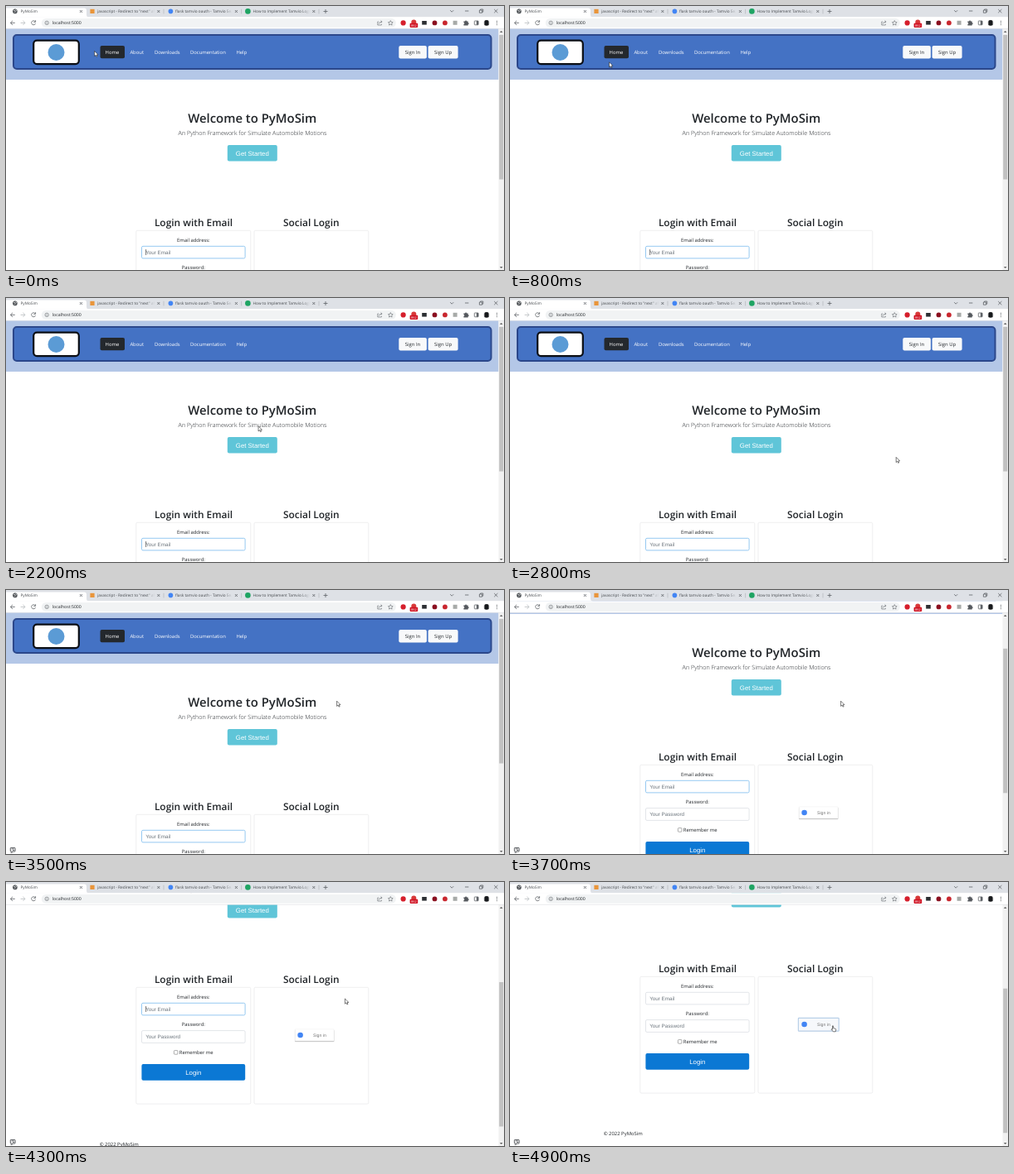
These frames come from a looping animation (600x319 px, 5 s). An HTML page:

```html
<!DOCTYPE html>
<html lang="en">
<head>
<meta charset="utf-8">
<title>PyMoSim</title>
<style>
  html, body { margin: 0; width: 100%; height: 100%; overflow: hidden; background: #fff; }
  svg { display: block; width: 100%; height: 100%; }
  text { font: 5.9px "Open Sans", "Noto Sans", sans-serif; fill: #212529; text-rendering: geometricPrecision; white-space: pre; }
  .mid { text-anchor: middle; }
  .white { fill: #fff; }
  .h1 { font-size: 14.9px; font-weight: 600; }
  .h2 { font-size: 11.9px; font-weight: 600; }
  .lead { font-size: 7.2px; font-weight: 300; }
  .arial { font-family: "Liberation Sans", Arial, sans-serif; }
  .btn { font-size: 7.8px; fill: #fff; }
  .hint { font-size: 6.25px; fill: #6c757d; }
  .tab { font-size: 4.75px; fill: #45494d; }
  .line { fill: none; stroke: #5f6368; stroke-width: .8; }
  .card { fill: #fff; stroke: #e2e3e5; stroke-width: .6; }
  .field { fill: #fff; stroke: #ced4da; stroke-width: .6; }
  .field.focus { stroke: #7cbcee; stroke-width: .8; }
</style>
</head>
<body>
<svg viewBox="0 0 600 319" preserveAspectRatio="none">
  <defs>
    <linearGradient id="fade">
      <stop offset="0" stop-color="#dee1e6" stop-opacity="0"/>
      <stop offset="1" stop-color="#dee1e6"/>
    </linearGradient>
  </defs>
  <rect width="600" height="319" fill="#fff"/>

  <g id="page">
    <rect y="20" width="593.5" height="69" fill="#b4c7e7"/>
    <rect x="9" y="35" width="575.5" height="41" rx="4" fill="#4472c4" stroke="#2b478b" stroke-width="2"/>
    <rect x="33.2" y="41.7" width="54.6" height="28.4" rx="4" fill="#fff" stroke="#0b0e14" stroke-width="2.2"/>
    <circle cx="60.5" cy="56" r="10" fill="#5b9bd5"/>
    <rect x="113.5" y="48" width="29.5" height="15.3" rx="2" fill="#24282d"/>
    <g id="nav"></g>
    <rect x="473.3" y="48" width="33.6" height="15.6" rx="2" fill="#f8f9fa"/>
    <rect x="508.6" y="48" width="36" height="15.6" rx="2" fill="#f8f9fa"/>
    <text class="mid" x="490" y="58">Sign In</text>
    <text class="mid" x="526.6" y="58">Sign Up</text>

    <text class="h1 mid" x="296.7" y="141.2">Welcome to PyMoSim</text>
    <text class="lead mid" x="297" y="155.6">An Python Framework for Simulate Automobile Motions</text>
    <rect x="266.8" y="168" width="60" height="19.6" rx="2" fill="#5fc5d8"/>
    <text class="arial btn mid" x="296.8" y="180.6">Get Started</text>

    <text class="h2 mid" x="226" y="266">Login with Email</text>
    <text class="h2 mid" x="367.8" y="266">Social Login</text>
    <rect class="card" x="156.8" y="271.3" width="138" height="140.8" rx="1.5"/>
    <rect class="card" x="299" y="271.3" width="137.8" height="140.8" rx="1.5"/>

    <text class="mid" x="225.8" y="284.7">Email address:</text>
    <rect id="email" class="field" x="163.5" y="290.3" width="124.6" height="14.6" rx="1.5"/>
    <text class="arial hint" x="168.2" y="299.9">Your Email</text>
    <path id="caret" d="M168.6 294v7" stroke="#222" stroke-width=".6"/>
    <text class="mid" x="225.8" y="318.2">Password:</text>
    <rect class="field" x="163.5" y="323.6" width="124.6" height="14.8" rx="1.5"/>
    <text class="arial hint" x="168.2" y="333.3">Your Password</text>
    <rect x="202.4" y="347.6" width="4.6" height="4.6" rx=".8" fill="#fff" stroke="#767676" stroke-width=".6"/>
    <text x="208.8" y="352">Remember me</text>
    <rect x="163.4" y="364" width="124.8" height="19.8" rx="2" fill="#0b78d4"/>
    <text class="arial btn mid" x="225.8" y="376.6">Login</text>

    <rect x="347.9" y="323.1" width="47.6" height="14.2" rx=".8" fill="#000" opacity=".14"/>
    <rect x="348.1" y="322.6" width="47.1" height="14.1" rx=".6" fill="#000" opacity=".13"/>
    <rect x="348.2" y="321.9" width="46.9" height="14" rx=".5" fill="#fff" stroke="#e4e4e4" stroke-width=".3"/>
    <rect id="ring" x="347.4" y="321.4" width="48.8" height="15.8" rx=".6" fill="#f6f8fb" stroke="#b9d0e8" stroke-width="1.2"/>
    <circle cx="354.6" cy="329" r="3.3" fill="#4285f4"/>
    <text class="arial" x="370" y="330.8" style="font-size:5.2px;fill:#757575">Sign in</text>
    <text x="112.7" y="463.3">© 2022 PyMoSim</text>
  </g>

  <rect x="593.5" y="27" width="6.5" height="292" fill="#f1f1f1"/>
  <rect id="thumb" x="594.2" y="35" width="5" height="174.5"/>
  <path d="M594.9 32l1.8-2 1.8 2zM594.9 315l1.8 2 1.8-2z" fill="#606060"/>

  <g id="browser">
    <rect width="600" height="13.5" fill="#dee1e6"/>
    <path d="M0 13.5V2.5h94q3 0 3 3v5q0 3 3 3z" fill="#fff"/>
    <rect y="13.3" width="600" height="14" fill="#fff"/>
    <path d="M0 27.4h600" stroke="#dcdee2" stroke-width=".6"/>
    <g id="tabs"></g>
    <circle cx="10.9" cy="6.4" r="2.8" fill="#505458"/>
    <path d="M8.9 5.2l2 .4.4 1.3-1.2 1.4M11.8 4.2l.4 1.1 1 .5" fill="none" stroke="#fff" stroke-width=".6"/>
    <path class="line" d="M385 4v5M382.5 6.5h5M535.2 5.2l2 2 2-2M553 6h4.4M570.4 5h3.2v3.2h-3.2zM571.6 5v-1h3.2v3.2h-1.1M588.2 4l4.2 4.2M592.4 4l-4.2 4.2"/>
    <path class="line" d="M10.8 20.4H5.4M8 17.8l-2.6 2.6L8 23"/>
    <path class="line" style="stroke:#b8bbbf" d="M17.6 20.4H23M20.4 17.8l2.6 2.6-2.6 2.6"/>
    <path class="line" d="M35.2 18.8a2.5 2.5 0 1 0 .3 2.4M35.6 17.2v2.2h-2.2"/>
    <rect x="42.8" y="15" width="427" height="10.8" rx="5.4" fill="#f1f3f4"/>
    <circle class="line" cx="49.2" cy="20.4" r="2.2" style="stroke-width:.6"/>
    <path class="line" d="M49.2 20v1.6M49.2 18.9v.5" style="stroke-width:.6"/>
    <text x="55.8" y="22.3" style="font-size:5.2px">localhost:5000</text>
    <path class="line" style="stroke-width:.6" d="M449 19h-1.2v4h4.6v-1.2M449.3 21.6q.3-2.6 3.6-2.6M451.6 17.6l1.5 1.4-1.5 1.4"/>
    <path class="line" style="stroke-width:.6" d="M463.3 17.6l.9 1.9 2 .2-1.5 1.4.4 2-1.8-1-1.8 1 .4-2-1.5-1.4 2-.2z"/>
    <circle cx="478.6" cy="20.4" r="3.1" fill="#d61f2c"/>
    <circle cx="491.3" cy="19.4" r="3" fill="#d83a3a"/>
    <rect x="486.6" y="20.8" width="9.6" height="5.2" rx="1" fill="#cf1020"/>
    <text class="white mid" x="491.4" y="24.9" style="font-size:4px">862</text>
    <rect x="501.2" y="18" width="5.6" height="4.6" fill="#2c2f33"/>
    <circle cx="516.5" cy="20.4" r="2.9" fill="#8a1020"/>
    <circle cx="528.9" cy="20.4" r="2.9" fill="#c9272f"/>
    <rect x="538.6" y="17.8" width="5" height="5" fill="#a7aaa8"/>
    <path d="M551.4 18.5h1.7a1 1 0 0 1 2 0h1.6v1.7a1 1 0 0 1 0 2v1.2h-5.3v-1.5a.9.9 0 0 0 0-1.8z" fill="#55595e"/>
    <rect class="line" x="564.3" y="18" width="4.8" height="4.8" rx=".6"/>
    <path d="M566.8 18h2.3v4.8h-2.3z" fill="#5f6368"/>
    <circle cx="579" cy="20.4" r="3.6" fill="#dcdcdc"/>
    <path d="M576.4 23v-3.6q0-2.4 2.6-2.4t2.6 2.4V23q-2.6 1.5-5.2 0z" fill="#17191c"/>
    <path d="M591.4 18.3v.1M591.4 20.4v.1M591.4 22.5v.1" stroke="#5f6368" stroke-width="1.1" stroke-linecap="round"/>
  </g>

  <g id="badge">
    <rect x="5.3" y="311.4" width="5.8" height="4.6" rx=".8" fill="#fff" stroke="#33373b" stroke-width=".8"/>
    <path d="M6.6 312.9h3.2M8.3 314.5h1.8M5.6 317.2h2.2" stroke="#33373b" stroke-width=".8"/>
  </g>
  <path id="arrow" d="M0 0V6.2L1.5 4.9 2.5 7 3.5 6.5 2.6 4.5 4.4 4.4Z" fill="#fff" stroke="#222" stroke-width=".6"/>
  <path id="hand" d="M-.5 0q.6-.5 1.1.2V2.9l2.3.5q.8.2.8 1.1L3.2 7H.4L-1.8 4.5q0-.8.8-.5l.5.5Z" fill="#fff" stroke="#222" stroke-width=".6"/>
</svg>

<script>
const LOOP = 5000, STEP = 100;
const $ = id => document.getElementById(id);
const show = (id, on) => $(id).setAttribute("visibility", on ? "visible" : "hidden");
const place = (id, x, y) => $(id).setAttribute("transform", `translate(${x} ${y})`);

const nav = [["Home", 119.6], ["About", 149.4], ["Downloads", 178.9], ["Documentation", 222], ["Help", 277.4]];
$("nav").innerHTML = nav.map(([label, x]) => `<text class="white" x="${x}" y="58">${label}</text>`).join("");

const square = '<rect x="101.4" y="3.8" width="5.2" height="5.2" fill="#e9953a"/>';
const dot = (x, r, color) => `<circle cx="${x}" cy="6.4" r="${r}" fill="${color}"/>`;
const tabs = [
  ["PyMoSim", 17.4, 90.4, ""],
  ['javascript - Redirect to "next" aft', 110, 183.8, square],
  ["flask tamvio oauth - Tamvio Sea", 204, 277.4, dot(198.4, 2.8, "#4285f4")],
  ["How to Implement Tamvio Login", 297.6, 370.8, dot(291.4, 3.3, "#1fa463")]
];
$("tabs").innerHTML = tabs.map(([title, x, close, icon], i) => `${icon}
  <svg x="${x}" y="0" width="${close - x - 5.4}" height="13"><text class="tab" y="8.2">${title}</text></svg>
  ${i ? `<rect x="${close - 14}" y="2" width="9" height="10" fill="url(#fade)"/>
  <path class="line" style="stroke:#a0a4a9;stroke-width:.5" d="M${close + 6.2} 3.8v5.6"/>` : ""}
  <path class="line" d="M${close - 1.5} 5l3 3M${close + 1.5} 5l-3 3"/>`).join("");

// Keys are [time, value, ...]; values between keys are interpolated.
const pointer = [
  [0, 106.6, 54.4], [500, 108, 57], [1700, 181.5, 126.2], [2800, 465.2, 192.4], [3000, 592, 178],
  [3100, 592, 172], [3500, 398.6, 134.2], [3700, 398.6, 134.2], [4100, 408.4, 139.8],
  [4300, 408.4, 141], [4700, 389, 173.8], [5000, 389, 173.8]
];
const scroll = [
  [0, 0], [3500, 0], [3600, 24], [3700, 60], [3800, 76], [3900, 78],
  [4000, 78], [4100, 88], [4200, 117], [4300, 144], [4400, 157], [5000, 157]
];
const linear = u => u;
const smooth = u => u * u * (3 - 2 * u);

function track(keys, t, ease) {
  const i = keys.findIndex(k => k[0] > t);
  const a = keys[i - 1], b = keys[i];
  const u = ease((t - a[0]) / (b[0] - a[0]));
  return a.slice(1).map((v, j) => v + (b[j + 1] - v) * u);
}

function draw(t) {
  const [top] = track(scroll, t, linear);
  const [x, y] = track(pointer, t, smooth);
  const overButton = x > 348 && x < 395 && y > 322 - top && y < 336 - top;
  const overBar = x > 590;
  const clicked = t >= 4900;

  place("page", 0, -top);
  place("thumb", 0, top * 0.597);
  $("thumb").setAttribute("fill", overBar ? "#a8a8a8" : "#c1c1c1");
  $("email").classList.toggle("focus", !clicked);
  show("ring", clicked);
  show("caret", !clicked && (t + 320) % 1060 < 530);
  show("badge", t >= 3200);
  show("arrow", !overButton);
  show("hand", overButton);
  place("arrow", x, y);
  place("hand", x, y);
}

const start = performance.now();
function tick() {
  const t = (performance.now() - start) % LOOP;
  draw(Math.floor(t / STEP) * STEP);
  requestAnimationFrame(tick);
}
tick();
</script>
</body>
</html>
```
